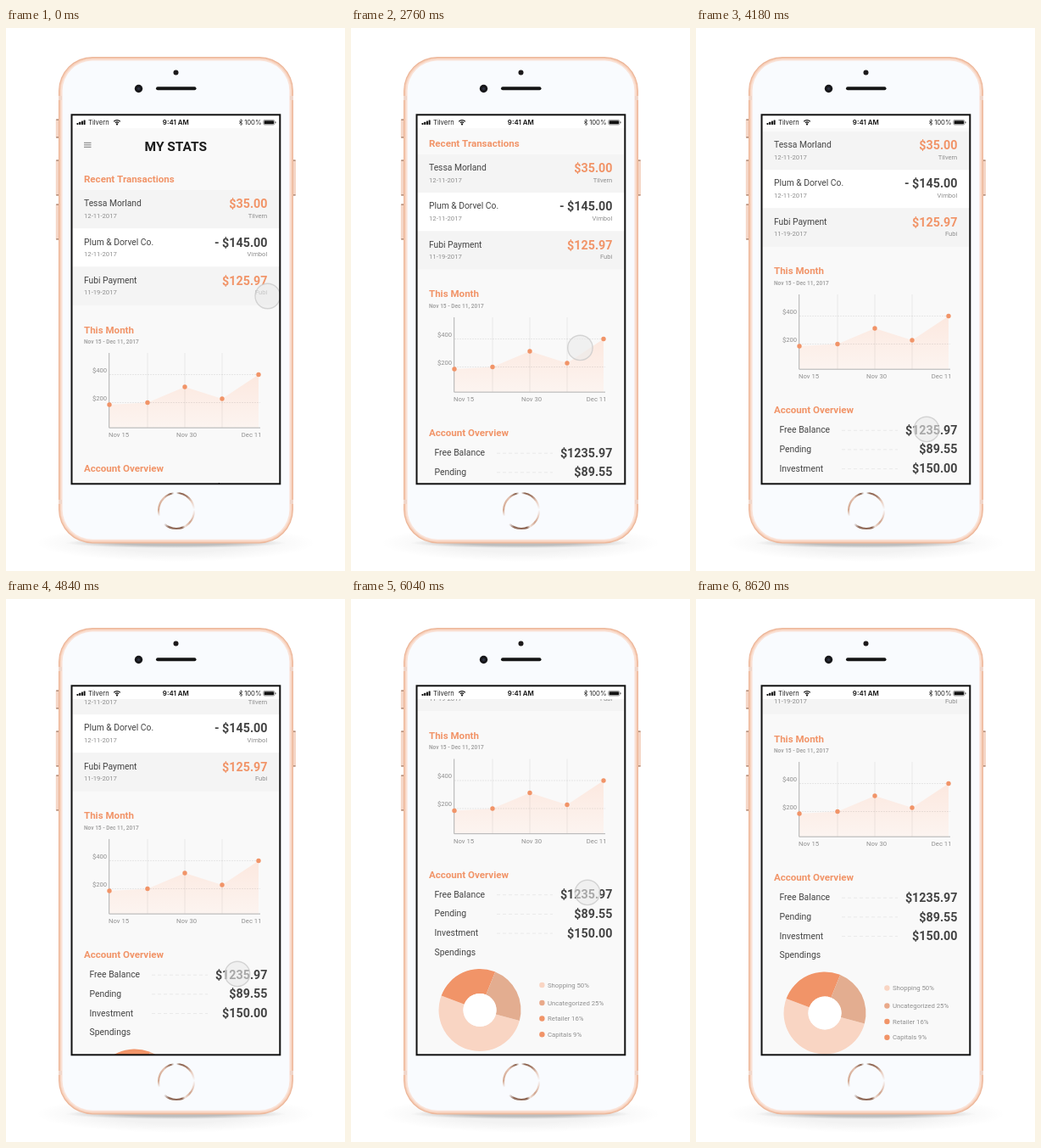
These frames come from a looping animation (400x640 px, 8640 ms). An HTML page with a canvas:

```html
<!DOCTYPE html>
<html lang="en">
<head>
<meta charset="utf-8">
<title>My Stats</title>
<style>
  html, body { margin: 0; width: 100%; height: 100%; overflow: hidden; background: #fff; }
  canvas { display: block; width: 400px; height: 640px; }
</style>
</head>
<body>
<canvas id="stage"></canvas>
<script>
const LOOP = 8640;
const canvas = document.getElementById('stage');
const ctx = canvas.getContext('2d');
const dpr = window.devicePixelRatio || 1;
canvas.width = 400 * dpr;
canvas.height = 640 * dpr;

const ORANGE = '#f19468', BLUSH = '#f9d5c3', TAN = '#e3ad90';
const INK = '#444', MUTED = '#8f8f8f', PAGE = '#f9f9f9', FACE = '#f9fbfe';
const ROBOTO = 'Roboto, sans-serif', INTER = 'Inter, sans-serif';
const SCREEN = [77.5, 102.3, 245.8, 435];

// Keyframes are [time, value]
const scrollKeys = [[1950, 0], [3260, 67], [3460, 69], [4180, 69], [4840, 100],
  [5360, 155], [6040, 194.5], [6200, 195.5], [6700, 191]];
const pointerX = [[0, 308.7], [1700, 269.6], [3260, 271], [4840, 273], [5360, 274],
  [6040, 279], [6200, 283], [6700, 345]];
const pointerY = [[0, 316], [1700, 421], [1950, 421], [3260, 351], [3460, 349],
  [4160, 473], [4840, 442], [5360, 388], [6040, 346], [6200, 343], [6700, 322]];

// Monotone cubic interpolation
function sample(keys, t) {
  const last = keys.length - 1;
  if (t <= keys[0][0]) return keys[0][1];
  if (t >= keys[last][0]) return keys[last][1];
  let i = 0;
  while (t > keys[i + 1][0]) i++;
  const grade = n => (keys[n + 1][1] - keys[n][1]) / (keys[n + 1][0] - keys[n][0]);
  const slope = n => {
    if (n === 0 || n === last) return 0;
    const a = grade(n - 1), b = grade(n);
    return a * b <= 0 ? 0 : 2 * a * b / (a + b);
  };
  const h = keys[i + 1][0] - keys[i][0];
  const u = (t - keys[i][0]) / h, u2 = u * u, u3 = u2 * u;
  return (2 * u3 - 3 * u2 + 1) * keys[i][1] + (u3 - 2 * u2 + u) * h * slope(i)
    + (3 * u2 - 2 * u3) * keys[i + 1][1] + (u3 - u2) * h * slope(i + 1);
}

function rect(x, y, w, h, color) {
  ctx.fillStyle = color;
  ctx.fillRect(x, y, w, h);
}

function round(x, y, w, h, r, color) {
  ctx.beginPath();
  ctx.roundRect(x, y, w, h, r);
  ctx.fillStyle = color;
  ctx.fill();
}

function dot(x, y, r, color) {
  ctx.beginPath();
  ctx.arc(x, y, r, 0, Math.PI * 2);
  ctx.fillStyle = color;
  ctx.fill();
}

function line(points, color, width = 1, dash = []) {
  ctx.beginPath();
  points.forEach(([x, y]) => ctx.lineTo(x, y));
  ctx.strokeStyle = color;
  ctx.lineWidth = width;
  ctx.setLineDash(dash);
  ctx.stroke();
  ctx.setLineDash([]);
}

function text(str, x, y, size, color, { align = 'left', weight = 400, font = ROBOTO } = {}) {
  ctx.font = `${weight} ${size}px ${font}`;
  ctx.textAlign = align;
  ctx.fillStyle = color;
  ctx.fillText(str, x, y);
}

const heading = (str, y) => text(str, 92, y, 11.55, ORANGE, { weight: 700 });
const amount = (str, y, color) => text(str, 308.5, y, 14.3, color, { align: 'right', weight: 700 });

function shadow(radius, height, alpha) {
  ctx.save();
  ctx.translate(200, 607);
  ctx.scale(1, height / radius);
  const g = ctx.createRadialGradient(0, 0, radius * 0.5, 0, 0, radius);
  g.addColorStop(0, `rgba(0,0,0,${alpha})`);
  g.addColorStop(1, 'rgba(0,0,0,0)');
  ctx.fillStyle = g;
  ctx.fillRect(-radius, -radius, radius * 2, radius * 2);
  ctx.restore();
}

function drawPhone() {
  shadow(165, 22, 0.05);
  shadow(130, 6, 0.22);
  for (const [x, y, h] of [[58.8, 107, 23], [58.8, 155, 43], [58.8, 207, 43], [338, 155, 43]]) {
    round(x, y, 4, h, 1.5, '#f5d6c6');
    rect(x + 0.4, y + 0.5, 3.2, 1.3, '#a98573');
    rect(x + 0.4, y + h - 1.8, 3.2, 1.3, '#a98573');
  }
  const shells = [[0, '#ecb598'], [1.2, '#f7d0ba'], [2.8, '#fae2d7'], [4.6, FACE]];
  for (const [d, color] of shells) {
    round(62 + d, 34 + d, 277 - 2 * d, 573.4 - 2 * d, 40 - d, color);
  }
  for (const y of [80, 556]) {
    rect(62, y, 4, 5, '#f0d6ca');
    rect(335, y, 4, 5, '#f0d6ca');
  }
  dot(200.5, 52.5, 3, '#1d1a1b');
  dot(156.5, 71.5, 4.7, '#17171a');
  dot(156.5, 71.5, 1.8, '#2c3040');
  round(177, 69.3, 47.5, 4, 2, '#151515');

  const ring = ctx.createConicGradient(-Math.PI / 2, 201, 569);
  const stops = [[0, FACE], [.03, '#8a6350'], [.1, '#a57c68'], [.16, '#e9cdbf'], [.24, FACE],
    [.3, '#ead2c6'], [.36, '#d0a48e'], [.42, '#f1e2da'], [.45, '#8d6553'], [.57, '#94705f'],
    [.62, FACE], [.7, FACE], [.76, '#d3a890'], [.88, '#e2bfae'], [.95, '#8a6350'], [.98, FACE], [1, FACE]];
  stops.forEach(([p, c]) => ring.addColorStop(p, c));
  ctx.beginPath();
  ctx.arc(201, 569, 21, 0, Math.PI * 2);
  ctx.strokeStyle = ring;
  ctx.lineWidth = 2.2;
  ctx.stroke();
}

function drawTransactions() {
  for (let i = 0; i < 3; i++) line([[92, 135.3 + i * 2.5], [100.5, 135.3 + i * 2.5]], '#777', 1);
  text('MY STATS', 200.3, 145, 15.5, '#1c1c1c', { align: 'center', weight: 700 });
  heading('Recent Transactions', 182);
  const rows = [
    ['Tessa Morland', '12-11-2017', '$35.00', 'Tilvern', ORANGE],
    ['Plum & Dorvel Co.', '12-11-2017', '- $145.00', 'Vimbol', INK],
    ['Fubi Payment', '11-19-2017', '$125.97', 'Fubi', ORANGE]
  ];
  rows.forEach(([name, date, sum, via, color], i) => {
    const y = 191 + i * 45.2;
    rect(78, y, 245, 45.2, i % 2 ? '#fff' : '#f4f4f4');
    text(name, 92, y + 19.3, 10.3, INK);
    text(date, 92, y + 32.7, 7.7, MUTED);
    amount(sum, y + 21.3, color);
    text(via, 308.3, y + 32.7, 7.6, MUTED, { align: 'right' });
  });
}

function drawChart() {
  heading('This Month', 359.5);
  text('Nov 15 - Dec 11, 2017', 92, 371.8, 6.5, '#a6a6a6', { weight: 700 });
  const pts = [[122, 444], [167, 441.5], [211, 423], [255, 437], [298, 408.5]];
  const g = ctx.createLinearGradient(0, 408, 0, 471);
  g.addColorStop(0, '#fce8df');
  g.addColorStop(1, '#fcf4f0');
  ctx.beginPath();
  pts.forEach(([x, y]) => ctx.lineTo(x, y));
  ctx.lineTo(298, 471);
  ctx.lineTo(122, 471);
  ctx.fillStyle = g;
  ctx.fill();
  for (const x of [167, 211, 255]) line([[x, 383], [x, 471]], 'rgba(0,0,0,.08)', 0.9);
  for (const y of [408.5, 441.5]) line([[122, y], [300, y]], 'rgba(0,0,0,.09)', 0.9, [2, 1]);
  line([[121.7, 383], [121.7, 471.2], [300, 471.2]], '#b0b0b0', 1);
  pts.forEach(([x, y]) => dot(x, y, 2.7, ORANGE));
  text('$400', 119, 406, 7.6, MUTED, { align: 'right' });
  text('$200', 119, 439, 7.6, MUTED, { align: 'right' });
  text('Nov 15', 121, 482.3, 7.7, MUTED);
  text('Nov 30', 213, 482.3, 7.7, MUTED, { align: 'center' });
  text('Dec 11', 301.5, 482.3, 7.7, MUTED, { align: 'right' });
}

function drawAccount() {
  heading('Account Overview', 523.3);
  const rows = [['Free Balance', '$1235.97'], ['Pending', '$89.55'], ['Investment', '$150.00'], ['Spendings']];
  rows.forEach(([label, sum], i) => {
    const y = 542.7 + i * 22.7;
    text(label, 98.5, y + 3.6, 10.4, INK);
    if (!sum) return;
    line([[172, y + 0.5], [238, y + 0.5]], '#e8e8e8', 0.9, [4, 3]);
    amount(sum, y + 5.1, INK);
  });

  const cx = 152, cy = 679, rad = Math.PI / 180;
  for (const [from, to, color] of [[15, 200.5, BLUSH], [200.5, 292, ORANGE], [292, 375, TAN]]) {
    ctx.beginPath();
    ctx.arc(cx, cy, 48.5, from * rad, to * rad);
    ctx.arc(cx, cy, 19.5, to * rad, from * rad, true);
    ctx.fillStyle = color;
    ctx.fill();
  }
  dot(cx, cy, 19.6, '#fff');

  const legend = [['Shopping 50%', 649.5, BLUSH], ['Uncategorized 25%', 670.5, '#e9a98a'],
    ['Retailer 16%', 689, ORANGE], ['Capitals 9%', 707.7, ORANGE]];
  for (const [label, y, color] of legend) {
    dot(225.4, y, 3.2, color);
    text(label, 232, y + 2.7, 7.75, MUTED);
  }
}

function drawStatusBar() {
  rect(78, 103, 245, 15, '#fff');
  for (let i = 0; i < 4; i++) {
    const h = 2 + i * 1.2;
    round(83.5 + i * 2.7, 114 - h, 2, h, 0.4, '#111');
  }
  text('Tilvern', 97, 114, 7.6, '#222', { font: INTER });
  ctx.strokeStyle = '#111';
  ctx.lineWidth = 1.2;
  for (const r of [3, 5.3]) {
    ctx.beginPath();
    ctx.arc(131, 114, r, Math.PI * 1.25, Math.PI * 1.75);
    ctx.stroke();
  }
  dot(131, 113.4, 1.1, '#111');
  text('9:41 AM', 200.3, 114, 7.9, '#111', { align: 'center', weight: 600, font: INTER });
  line([[275, 109.5], [279, 112.8], [277, 114.6], [277, 107.6], [279, 109.4], [275, 112.7]], '#222', 0.7);
  text('100%', 301.5, 114, 7.7, '#222', { align: 'right', font: INTER });
  ctx.beginPath();
  ctx.roundRect(303.8, 108.4, 13, 5.6, 1.4);
  ctx.strokeStyle = '#555';
  ctx.lineWidth = 0.6;
  ctx.stroke();
  round(304.6, 109.2, 11.4, 4, 0.7, '#111');
  round(317.4, 110.2, 1.1, 2, 0.5, '#444');
}

function drawPointer(x, y) {
  ctx.beginPath();
  ctx.arc(x, y, 14.7, 0, Math.PI * 2);
  ctx.fillStyle = 'rgba(235,235,235,.6)';
  ctx.fill();
  ctx.strokeStyle = 'rgba(200,200,200,.75)';
  ctx.lineWidth = 1.4;
  ctx.stroke();
}

function draw(t) {
  ctx.setTransform(dpr, 0, 0, dpr, 0, 0);
  rect(0, 0, 400, 640, '#fff');
  drawPhone();

  ctx.save();
  ctx.beginPath();
  ctx.rect(...SCREEN);
  ctx.clip();
  rect(...SCREEN, PAGE);
  ctx.save();
  ctx.translate(0, -sample(scrollKeys, t));
  drawTransactions();
  drawChart();
  drawAccount();
  ctx.restore();
  drawStatusBar();
  if (t < 6700) drawPointer(sample(pointerX, t), sample(pointerY, t));
  ctx.restore();

  ctx.strokeStyle = '#111';
  ctx.lineWidth = 2;
  ctx.strokeRect(...SCREEN);
}

const start = performance.now();
function tick() {
  draw((performance.now() - start) % LOOP);
  requestAnimationFrame(tick);
}
tick();
</script>
</body>
</html>
```
